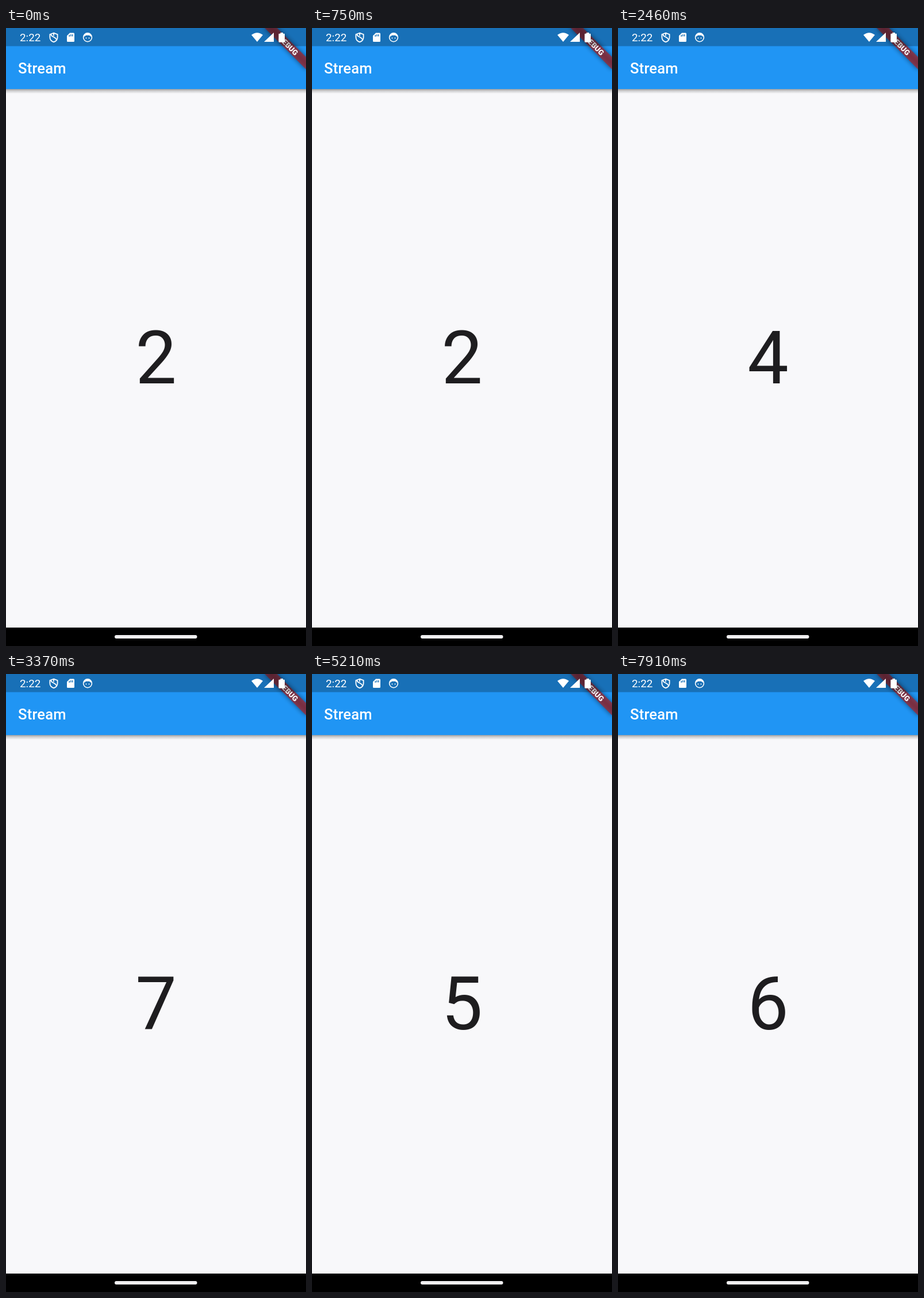
Animation of 522 by 1073 pixels, one loop 8 s. Source, as an HTML page:

```html
<!DOCTYPE html>
<html lang="en">
<head>
<meta charset="utf-8">
<title>Stream</title>
<style>
  html, body { margin: 0; width: 100%; height: 100%; overflow: hidden; background: #f8f8fa; }
  svg { display: block; width: 522px; height: 1073px; font-family: Roboto, sans-serif; }
</style>
</head>
<body>
<svg viewBox="0 0 522 1073">
  <defs>
    <filter id="soft" x="-20%" y="-100%" width="140%" height="300%">
      <feGaussianBlur stdDeviation="4.5"/>
    </filter>
    <linearGradient id="shade" x1="0" y1="0" x2="0" y2="1">
      <stop offset="0" stop-opacity=".36"/>
      <stop offset=".4" stop-opacity=".17"/>
      <stop offset="1" stop-opacity="0"/>
    </linearGradient>
  </defs>

  <rect width="522" height="1073" fill="#f8f8fa"/>
  <rect y="106" width="522" height="8" fill="url(#shade)"/>
  <rect width="522" height="106" fill="#2095f4"/>
  <text x="21" y="79" font-size="25.6" font-weight="500" letter-spacing=".2" fill="#fff">Stream</text>

  <text id="digit" x="261" y="617" font-size="127.5" text-anchor="middle" fill="#1e1d1f">2</text>

  <!-- corner ribbon -->
  <g transform="translate(522 0) rotate(45)">
    <rect x="-51" y="35.6" width="102" height="15.2" fill-opacity=".5" filter="url(#soft)"/>
    <rect x="-51" y="35.6" width="102" height="15.2" fill="#b71c1c" fill-opacity=".627"/>
    <text y="47.8" font-size="12.9" font-weight="900" text-anchor="middle" fill="#fff">DEBUG</text>
  </g>

  <!-- status bar -->
  <rect width="522" height="31.5" fill-opacity=".25"/>
  <text x="24" y="23" font-size="18.9" fill="#fff">2:22</text>
  <g fill="none" stroke="#fff" stroke-width="1.8">
    <path d="M83 8.6 89.6 11.2V16C89.6 20 87 23 83 24.4 79 23 76.4 20 76.4 16V11.2Z"/>
    <path d="M78 11C79 16 87 15 88 21M83 9V13.5"/>
    <circle cx="142" cy="16.3" r="7.4" stroke-width="1.6"/>
  </g>
  <g fill="#fff">
    <path fill-rule="evenodd" d="M111 8.5H117.6Q119 8.5 119 10V22.5Q119 24 117.6 24H107.4Q106 24 106 22.5V13.5ZM109.5 12V15H111V12ZM112.2 11V14.5H113.7V11ZM115 11V14.5H116.5V11Z"/>
    <path d="M135 15C135.5 10.8 138 9 142 9S148.5 10.8 149 15L146.5 14.2 145 12.8H139L137.5 14.2Z"/>
    <circle cx="139.5" cy="17.5" r="1"/>
    <circle cx="144.5" cy="17.5" r="1"/>
    <path d="M437 24 427 12Q437 4.4 447 12Z"/>
    <path d="M466 8V24H449Z"/>
    <path d="M477.5 8H482V9.8H484Q485 9.8 485 11V23.6Q485 24.8 484 24.8H475.4Q474.4 24.8 474.4 23.6V11Q474.4 9.8 475.4 9.8H477.5Z"/>
  </g>

  <!-- navigation bar -->
  <rect y="1041" width="522" height="32"/>
  <rect x="189" y="1054" width="143.5" height="6" rx="3" fill="#f1f0f2"/>
</svg>
<script>
  const LOOP = 8000, PERIOD = 2000, LEAD = 1000;
  const values = [2, 4, 7, 5, 6];
  const digit = document.getElementById("digit");
  const start = performance.now();

  function draw() {
    const t = (performance.now() - start) % LOOP;
    const value = String(values[Math.floor((t + LEAD) / PERIOD)]);
    if (digit.textContent !== value) digit.textContent = value;
    requestAnimationFrame(draw);
  }
  draw();
</script>
</body>
</html>
```
